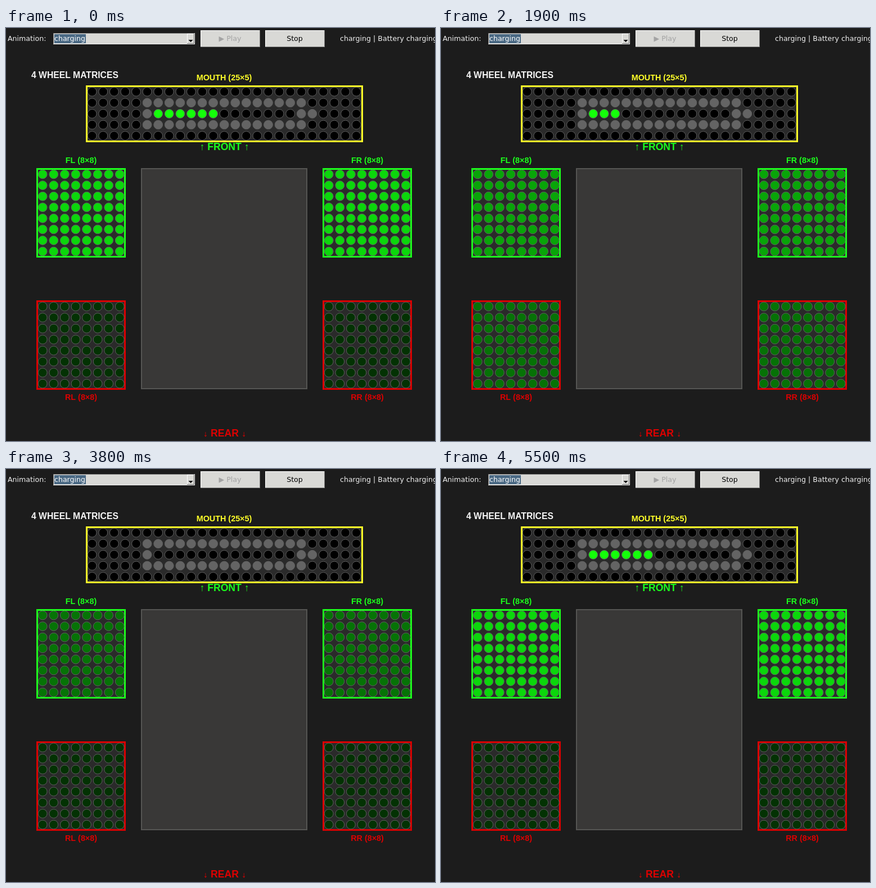
An HTML page with a canvas that plays this animation: 763 by 734 pixels, repeating every 5.6 s.

```html
<!DOCTYPE html>
<html lang="en">
<head>
<meta charset="utf-8">
<title>Charging animation</title>
<style>
html, body { margin: 0; width: 100%; height: 100%; overflow: hidden; background: #1c1c1c; }
canvas { display: block; }
</style>
</head>
<body>
<canvas id="stage" width="763" height="734"></canvas>
<script>
const ctx = document.getElementById('stage').getContext('2d');
const STEP = 400, STATES = 7, LOOP = 5600;
const PITCH = 19.58, RADIUS = 7.9;
const UI = '12.6px "DejaVu Sans", sans-serif';
const bold = size => `bold ${size}px "Liberation Sans", Arial, sans-serif`;
const GREEN = '#1cff1c', RED = '#dc0000', YELLOW = '#ffff28';

function fill(x, y, w, h, color) {
  ctx.fillStyle = color;
  ctx.fillRect(x, y, w, h);
}

function text(str, x, y, font, color, align = 'center') {
  ctx.font = font;
  ctx.fillStyle = color;
  ctx.textAlign = align;
  ctx.fillText(str, x, y);
}

function frame(x, y, w, h, width, line, inside) {
  fill(x, y, w, h, line);
  fill(x + width, y + width, w - 2 * width, h - 2 * width, inside);
}

function bevel(x, y, w, h, light, dark) {
  fill(x, y, w, h, dark);
  fill(x, y, w - 1, h - 1, light);
  fill(x + 1, y + 1, w - 2, h - 2, '#d9d9d6');
}

function button(x, label, color) {
  bevel(x, 4, 106, 30, '#ffffff', '#828282');
  text(label, x + 52.5, 23, UI, color);
}

function dots(x, y, cols, rows, colorAt) {
  ctx.lineWidth = 1;
  ctx.strokeStyle = '#606060';
  for (let r = 0; r < rows; r++) {
    for (let c = 0; c < cols; c++) {
      ctx.beginPath();
      ctx.arc(x + c * PITCH, y + r * PITCH, RADIUS, 0, 2 * Math.PI);
      ctx.fillStyle = colorAt(c, r);
      ctx.fill();
      ctx.stroke();
    }
  }
}

function toolbar() {
  text('Animation:', 3, 23, UI, '#f0f0f0', 'left');
  bevel(84, 9, 252, 20, '#828282', '#f4f4f4');
  fill(86, 11, 56, 16, '#4a6984');
  text('charging', 86, 23, UI, '#ffffff', 'left');
  bevel(322, 10, 13, 18, '#ffffff', '#6c6c6c');
  ctx.fillStyle = '#000';
  ctx.beginPath();
  ctx.moveTo(324.5, 21);
  ctx.lineTo(332.5, 21);
  ctx.lineTo(328.5, 25);
  ctx.fill();
  button(346, '▶ Play', '#a3a3a3');
  button(461, 'Stop', '#000000');
  text('charging | Battery charging', 594, 23, UI, '#f0f0f0', 'left');
}

function mouth(count) {
  frame(142, 102, 493, 101, 3, YELLOW, '#2a2a2a');
  dots(153.2, 113.2, 25, 5, (c, r) => {
    const cap = r === 2 && (c === 5 || c === 19 || c === 20);
    const rail = (r === 1 || r === 3) && c >= 5 && c <= 19;
    if (cap || rail) return '#646464';
    return r === 2 && c >= 6 && c < 6 + count ? '#14ff0a' : '#000';
  });
}

function wheel(x, y, name, labelY, line, level) {
  const green = Math.round(Math.max(0, Math.min(255, level)));
  const tint = Math.round(green / 20);
  const color = `rgb(${tint},${green},${tint})`;
  frame(x, y, 159, 159, 3, line, '#2a2a2a');
  dots(x + 11.2, y + 11, 8, 8, () => color);
  text(`${name} (8×8)`, x + 79.5, labelY, bold(14.36), line);
}

function draw(state) {
  const phase = state / 8;
  const front = 115 + 200 * phase;
  const rear = 50 + 64 * Math.sin(2 * Math.PI * phase);

  fill(0, 0, 763, 734, '#1c1c1c');
  toolbar();
  text('4 WHEEL MATRICES', 45, 89, bold(15.7), '#f4f4f4', 'left');
  text('MOUTH (25×5)', 388, 93, bold(14.36), YELLOW);
  mouth(Math.floor(13 * phase));
  text('↑ FRONT ↑', 388.5, 217, bold(17.6), GREEN);
  frame(240, 249, 296, 393, 2, '#555553', '#393837');

  wheel(54, 249, 'FL', 240, GREEN, front);
  wheel(563, 249, 'FR', 240, GREEN, front);
  wheel(54, 484, 'RL', 661, RED, rear);
  wheel(563, 484, 'RR', 661, RED, rear);
  text('↓ REAR ↓', 389, 726, bold(17.6), RED);
  // Only the arrow heads of the rear label stay visible.
  fill(349, 708, 12, 10, '#1c1c1c');
  fill(417, 708, 12, 10, '#1c1c1c');
}

const start = performance.now();
function tick() {
  const t = (performance.now() - start) % LOOP;
  draw((4 + Math.floor((t + 200) / STEP)) % STATES);
  requestAnimationFrame(tick);
}
tick();
</script>
</body>
</html>
```
